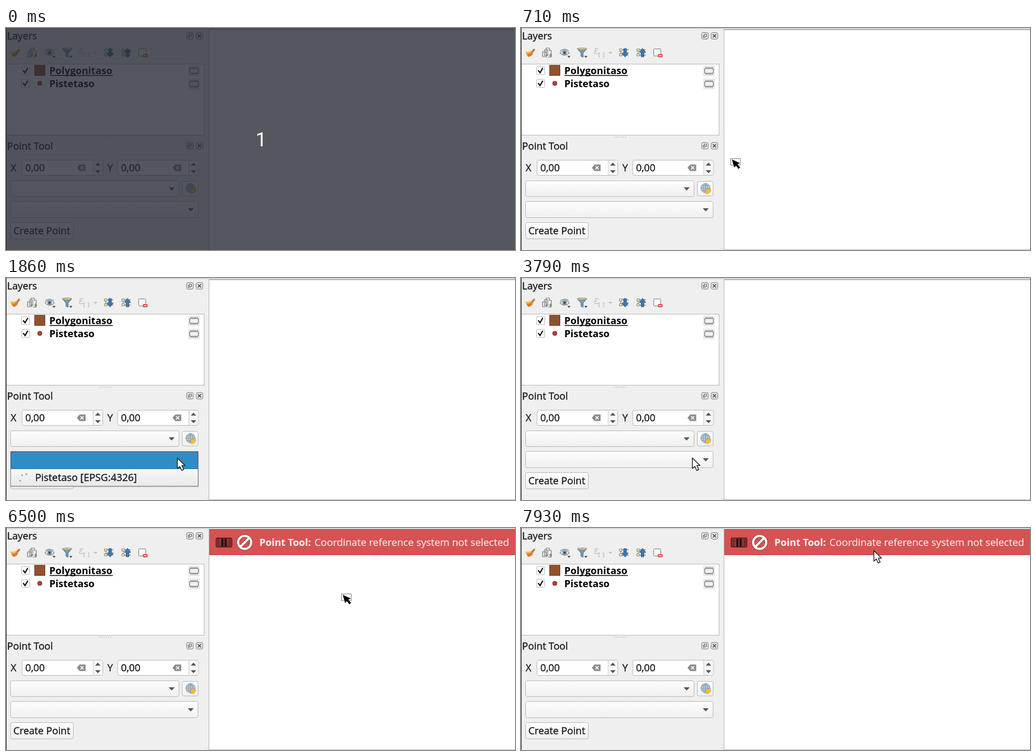
An HTML page that plays this animation: 934x409 px, repeating every 8 s.

```html
<!DOCTYPE html>
<html lang="en">
<head>
<meta charset="utf-8">
<title>Point Tool</title>
<style>
  html, body { margin: 0; width: 100%; height: 100%; overflow: hidden; background: #efefef; }
  svg { display: block; width: 100vw; height: 100vh; }
  text { font: 18.2px "Open Sans", "Noto Sans", sans-serif; fill: #161616; stroke: #161616; stroke-width: .35; white-space: pre; }
  .bold { font-size: 18px; font-weight: 700; fill: #000; stroke: none; }
  .long { font-size: 18.430px; }
  .light { fill: #fbecec; stroke: #fbecec; stroke-width: .2; }
  .box { fill: url(#face); stroke: #b6b6b6; }
  .field { fill: #fff; stroke: #b6b6b6; }
  .line { fill: none; stroke: #666; }
</style>
</head>
<body>
<svg viewBox="0 0 934 409">
  <defs>
    <linearGradient id="face" x2="0" y2="1">
      <stop offset="0" stop-color="#fdfdfd"/><stop offset="1" stop-color="#f0f0f0"/>
    </linearGradient>
    <linearGradient id="menu" x2="0" y2="1">
      <stop offset=".5" stop-color="#f8f8f8"/><stop offset="1" stop-color="#e8e8e8"/>
    </linearGradient>
    <g id="dock">
      <rect x=".5" y=".5" width="12" height="12" rx="2.5" fill="#e8e8e8" stroke="#777"/>
    </g>
    <g id="float">
      <use href="#dock"/>
      <path class="line" d="M5.5 3.5h4v4h-4zM7.5 9.5h-4v-4h2" stroke-width="1.1"/>
    </g>
    <g id="close">
      <use href="#dock"/>
      <path d="M3.5 3.5l6 6m0-6l-6 6" stroke="#444" stroke-width="1.7"/>
    </g>
    <g id="check">
      <rect x=".5" y=".5" width="15" height="15" rx="2" fill="#fff" stroke="#b6b6b6"/>
      <path d="M3.500 7.500l3.500 4.500 5-9" fill="none" stroke="#111" stroke-width="2.300"/>
    </g>
    <g id="chip">
      <rect width="22" height="20" rx="2" fill="#ebebeb"/>
      <path d="M5.500 3v14m3.700-14v14m3.700-14v14m3.700-14v14" stroke="#8a8a8a" stroke-width="1.800"/>
      <rect x="3" y="5.500" width="16" height="9" rx="2" fill="#f1f1f1" stroke="#858585" stroke-width="1.500"/>
    </g>
    <g id="spin">
      <rect class="field" x=".5" y=".5" width="148" height="28" rx="3"/>
      <path d="M131.5 1h13.5q3 0 3 3v21q0 3-3 3h-13.5z" fill="#f6f6f6"/>
      <path d="M131 1v27" stroke="#c4c4c4"/>
      <path d="M134.500 10.500l5-5.500 5 5.500zM134.500 19l5 5.500 5-5.500z" fill="#555"/>
      <path d="M101 14.500l5-6h11v12h-11z" fill="#8a8a8a"/>
      <path d="M107.500 11.500l6 6m0-6l-6 6" stroke="#fff" stroke-width="1.7"/>
      <text x="6.500" y="21">0,00</text>
    </g>
    <path id="drop" d="M-5.500-2.500h11l-5.500 6z" fill="#555"/>
    <path id="more" d="M-3-1.500h6l-3 3.500z" fill="#444"/>
    <g id="rows">
      <path d="M.5 1.500h5v4h-5zM.5 10.500h5v4h-5z" fill="#eadfae" stroke="#8d8a78"/>
      <path d="M6 3h11M6 13h11M3 6v4" stroke="#888" stroke-width="1.300"/>
    </g>
    <path id="down" d="M-2.500-8h5v8h3.500l-6 7.500-6-7.500h3.500z" fill="#3f79ab" stroke="#2d5f89"/>
  </defs>

  <rect width="934" height="409" fill="#efefef"/>
  <rect width="934" height="2" fill="#dadada"/>
  <path d="M1 1.500h371" stroke="#d2d2d2"/>
  <rect x="372" y="2" width="562" height="407" fill="#b4b4b4"/>
  <rect x="373" y="4" width="561" height="404" fill="#fff"/>

  <text x="2" y="21">Layers</text>
  <use href="#float" x="331" y="8"/><use href="#close" x="348.500" y="8"/>
  <text x="2" y="224">Point Tool</text>
  <use href="#float" x="331" y="210.500"/><use href="#close" x="348.500" y="210.500"/>

  <!-- toolbar -->
  <g>
    <path d="M19 46l5-6" stroke="#c47a36" stroke-width="3.600" stroke-linecap="round"/>
    <path d="M8 43q6 2 10-1l4 5q-3 6-9 6-4-4-5-10z" fill="#f0b95a"/>
    <path d="M10 47q6 1 9-3l3 3q-3 6-9 6z" fill="#dc7b2c"/>
  </g>
  <g fill="#f2f2f2" stroke="#777" stroke-width="1.200" stroke-linejoin="round">
    <path d="M46 37h6v13h-6zM43 40h6v11h-6zM39.500 44h7v9h-7z"/>
    <path d="M52 41h3.500v12.500H49"/>
    <path d="M51 50h6m-3-3v6" stroke="#58853a"/>
  </g>
  <g>
    <path d="M71.500 46q8.500-10 17 0-8.500 8-17 0z" fill="#e9eef2" stroke="#8a8a8a" stroke-width="1.200"/>
    <circle cx="80" cy="45.500" r="4" fill="#7196b0"/><circle cx="80" cy="45.500" r="1.700" fill="#273743"/>
    <path d="M72 42q8-6 16 0" class="line"/>
    <use href="#more" x="88" y="53"/>
  </g>
  <g>
    <path d="M103 38h18l-7 8v8l-4-2v-6z" fill="#6c9dc4" stroke="#486f8f"/>
    <ellipse cx="112" cy="38.500" rx="8.500" ry="1.800" fill="#d9c58c" stroke="#8c8060" stroke-width=".8"/>
    <use href="#more" x="119" y="53"/>
  </g>
  <g fill="none" stroke="#c8c8c8" stroke-width="1.700">
    <path d="M142 39q-6-3-6 1 0 2 4 2-5 0-5 3 0 4 8 1M145 46h-2v7h2m5-7h2v7h-2"/>
    <path d="M160 44h8l-4 4z" fill="#c4c4c4" stroke="none"/>
  </g>
  <use href="#rows" x="180" y="37"/>
  <use href="#down" x="191" y="46"/>
  <use href="#rows" x="212" y="37"/>
  <use href="#down" transform="translate(223 45) scale(1 -1)"/>
  <rect x="243.500" y="38.500" width="13" height="13" rx="1" fill="#f7f7f7" stroke="#777"/>
  <rect x="251" y="48" width="9" height="6" rx="2" fill="#d95050"/>
  <path d="M253 51h5" stroke="#fff" stroke-width="1.500"/>

  <!-- layer list -->
  <rect class="field" x=".5" y="66.500" width="363" height="131"/>
  <use href="#check" x="28" y="70.500"/><use href="#check" x="28" y="94"/>
  <rect x="52.500" y="68.500" width="19" height="19" fill="#91522d" stroke="#6c3d22"/>
  <circle cx="62" cy="102" r="4" fill="#bd3d34" stroke="#6e2a25"/>
  <text class="bold" x="79.500" y="85">Polygonitaso</text>
  <path d="M80 87.500h116" stroke="#000" stroke-width="1.300"/>
  <text class="bold" x="79.500" y="109">Pistetaso</text>
  <use href="#chip" x="334" y="69"/><use href="#chip" x="334" y="93"/>
  <path d="M171 201h22" stroke="#b0b0b0" stroke-width="1.500" stroke-dasharray="1.500 2.500"/>
  <path d="M367 406h5" stroke="#b0b0b0" stroke-dasharray="1 2"/>

  <!-- form -->
  <text x="8.500" y="264">X</text><use href="#spin" x="29" y="243"/>
  <text x="186" y="264">Y</text><use href="#spin" x="204.500" y="243"/>
  <rect class="box" x="8.500" y="281.500" width="309" height="29" rx="3"/><use href="#drop" x="304" y="296"/>
  <rect class="box" x="323.500" y="282.500" width="29" height="27" rx="3"/>
  <circle cx="338.500" cy="295" r="8.500" fill="#b9cad6" stroke="#7d95a5"/>
  <path d="M330 295h17m-15-4.500h13m-13 9h13M338.500 286.500v17m0-17q-9 8.500 0 17m0-17q9 8.500 0 17" fill="none" stroke="#7d95a5" stroke-width=".8"/>
  <path d="M339 297h9v4l-4 4h-5z" fill="#f1c232" stroke="#c09a34" stroke-width=".8"/>
  <rect id="combo" class="box" x="8.500" y="319.500" width="344" height="30" rx="3"/><use href="#drop" x="339" y="334.500"/>
  <rect id="button" class="box" x="8.500" y="358.500" width="115" height="30" rx="3"/>
  <text x="13.500" y="380">Create Point</text>

  <g id="popup">
    <rect x="8" y="321" width="346" height="64.500" rx="1" fill="#000" opacity=".14"/>
    <rect x="8.500" y="319.500" width="344" height="64" fill="url(#menu)" stroke="#7a7a7a"/>
    <rect x="9.500" y="320.500" width="342" height="31" fill="#308cc6" stroke="#2773a3"/>
    <g fill="#aaa"><circle cx="26" cy="373.500" r="1.700"/><circle cx="29.500" cy="363.500" r="1.700"/><circle cx="37.500" cy="361.500" r="1.700"/></g>
    <text class="long" x="53.500" y="374">Pistetaso [EPSG:4326]</text>
  </g>

  <g id="banner">
    <rect x="373" y="2" width="561" height="48" fill="#b84749"/>
    <rect x="373" y="3" width="561" height="46" fill="#d65253"/>
    <rect x="385.500" y="18.500" width="29" height="16.500" rx="2.500" fill="#8a3536" stroke="#461a1b" stroke-width="1.300"/>
    <path d="M389.500 21v12m21-12v12" stroke="#5c2324" stroke-width="2"/>
    <path d="M397 20v14m6-14v14" stroke="#180808" stroke-width="3.500"/>
    <g fill="none" stroke="#7c3031" stroke-width="5.500">
      <circle cx="438" cy="26.500" r="12"/><path d="M430 34.500l16-16"/>
    </g>
    <g fill="none" stroke="#fff" stroke-width="4">
      <circle cx="438" cy="26.500" r="12"/><path d="M430 34.500l16-16"/>
    </g>
    <text class="bold light" x="465" y="33">Point Tool:</text>
    <text class="long light" x="566" y="33">Coordinate reference system not selected</text>
  </g>

  <g id="arrow">
    <path d="M.5.5v19.500l4.500-4 3.300 7.500 3.700-1.700-3.300-7.300h5.800z" fill="#fff" stroke="#222" stroke-width="1.500" stroke-linejoin="round"/>
  </g>
  <g id="picker">
    <rect x="-3.500" y="-1.500" width="18" height="12" fill="none" stroke="#000" stroke-dasharray="1 1"/>
    <path d="M-1.500-.5l4.500 16 3.500-3.500 4.500 6 3.500-3-5-6 5-2z" fill="#000" stroke="#fff" stroke-width=".6"/>
  </g>

  <g id="dim">
    <rect width="934" height="409" fill="#252931" fill-opacity=".78"/>
    <rect x="373" width="561" height="4" fill="#4e475d"/>
    <path d="M1 408.500h933" stroke="#544a54"/>
    <text x="458" y="218" style="font:36px Roboto,sans-serif;fill:#fffef6;stroke:none">1</text>
  </g>
  <rect width="1" height="409" fill="#161616"/>
</svg>
<script>
  const LOOP = 8000, TICKS = 112;
  const el = id => document.getElementById(id);
  const show = (id, on) => { el(id).style.display = on ? '' : 'none'; };

  // pointer path: tick, x, y
  const path = [
    [3, 500, -40], [4, 497, -6], [7, 440, 140], [10, 388, 242], [12, 364, 303],
    [15, 352, 338], [18, 330, 334], [21, 314, 331], [60, 314, 331], [61, 306, 333],
    [64, 240, 350], [68, 140, 365], [72, 104, 368], [73, 95, 370], [75, 91, 371],
    [76, 92, 371], [86, 92, 371], [87, 112, 361], [89, 330, 254], [91, 619, 123],
    [94, 645, 80], [98, 660, 45], [101, 600, 43], [104, 502, 43], [107, 640, 44],
    [110, 507, 42], [111, 647, 41]
  ];

  function pointer(n) {
    if (n <= path[0][0]) return path[0].slice(1);
    const i = path.findIndex(p => p[0] >= n);
    const [a, ax, ay] = path[i - 1], [b, bx, by] = path[i];
    const k = (n - a) / (b - a);
    return [Math.round(ax + (bx - ax) * k), Math.round(ay + (by - ay) * k)];
  }

  const tickTime = n => Math.round(n * LOOP / TICKS / 10) * 10;
  function tickAt(t) {
    let n = Math.min(TICKS - 1, Math.floor(t * TICKS / LOOP) + 1);
    while (tickTime(n) > t) n--;
    return n;
  }

  function draw(t) {
    const n = tickAt(t), [x, y] = pointer(n);
    const banner = n >= 81;
    const onMap = x >= 373 && y >= (banner ? 50 : 4);
    show('dim', n < 1);
    show('popup', n >= 26 && n < 53);
    show('banner', banner);
    show('arrow', n >= 4 && !onMap);
    show('picker', n >= 4 && onMap);
    for (const id of ['arrow', 'picker']) el(id).setAttribute('transform', `translate(${x} ${y})`);
    el('combo').style.fill = n === 25 ? '#e2e2e2' : '';
    el('button').style.fill = n === 79 || n === 80 ? '#d8d8d8' : '';
  }

  const start = performance.now();
  function loop() {
    draw((performance.now() - start) % LOOP);
    requestAnimationFrame(loop);
  }
  loop();
</script>
</body>
</html>
```
